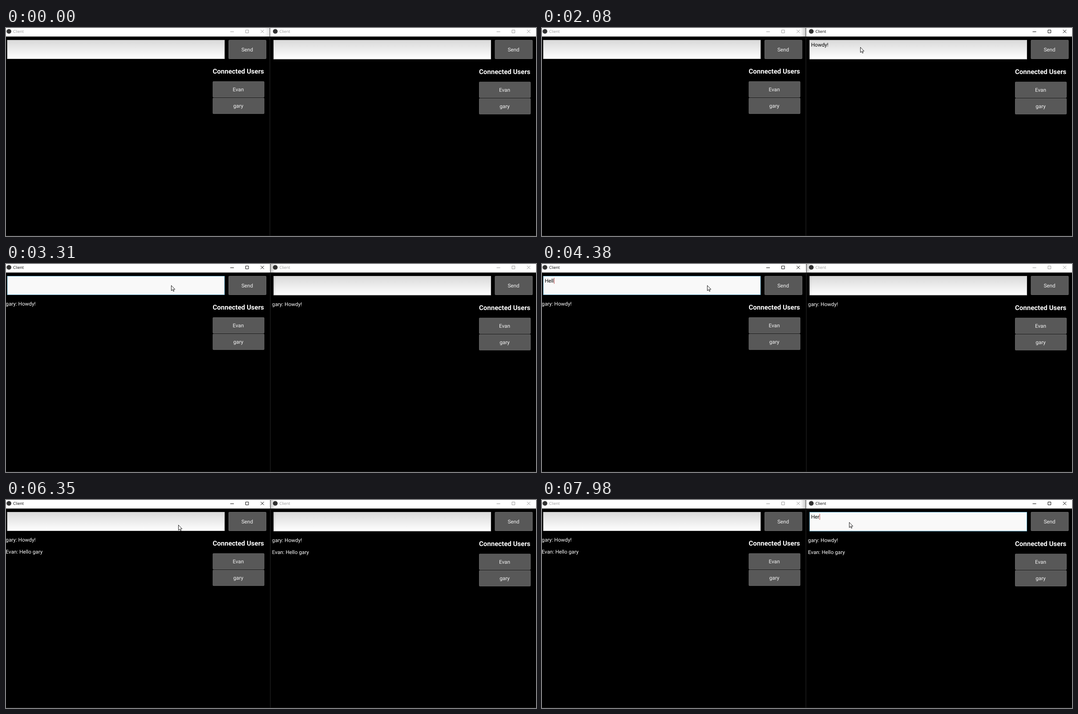
An HTML page for the animation above (8 s loop, 1191 px wide and 470 px high).

```html
<!DOCTYPE html>
<html lang="en">
<head>
<meta charset="utf-8">
<title>Chat clients</title>
<style>
  html, body { margin: 0; width: 100%; height: 100%; overflow: hidden; background: #000; }
  svg { display: block; width: 1191px; height: 470px; }
  text { font: 11.7px Roboto, sans-serif; fill: #fff; white-space: pre; text-rendering: geometricPrecision; }
  .mid { text-anchor: middle; fill: #f4f4f4; }
  .heading { font-size: 15px; font-weight: 700; text-anchor: middle; }
  .title { font: 9px "Open Sans", sans-serif; fill: #999; }
  .controls { fill: none; stroke: #999; }
  .active .title { fill: #000; }
  .active .controls { stroke: #000; }
  .button { fill: #585858; stroke: #686868; }
  .field { fill: url(#idle); stroke: #c4c4c4; }
  .focused .field { fill: #f9f9f9; stroke: #6db7d6; }
  .typed { fill: #000; }
  .caret { fill: #b03a3a; }
</style>
</head>
<body>
<svg viewBox="0 0 1191 470">
  <defs>
    <linearGradient id="idle" x1="0" y1="0" x2="0" y2="1">
      <stop offset="0" stop-color="#d9d9d9"/>
      <stop offset="1" stop-color="#fff"/>
    </linearGradient>
    <linearGradient id="shade">
      <stop offset="0" stop-opacity="0"/>
      <stop offset="1" stop-opacity=".22"/>
    </linearGradient>
  </defs>
  <g id="windows"></g>
  <rect id="shadow" width="12" height="470" fill="url(#shade)"/>
  <rect id="divider" y="0" width="1" height="470" fill="#2b2b2b"/>
  <path d="M0 469.5H1191" stroke="#1e1e1e"/>
  <path id="pointer" d="M.5 .5V12.4L3.2 9.8L5 13.9L6.8 13.1L5 9.2H8.7Z" fill="#fff" stroke="#000" stroke-width=".9"/>
</svg>
<script>
const LOOP = 8000;
const USERS = ["Evan", "gary"];
const MESSAGES = [
  { at: 2630, text: `${USERS[1]}: Howdy!` },
  { at: 5950, text: `${USERS[0]}: Hello ${USERS[1]}` },
];

// One entry per stay in a text field; keys holds the time of each typed letter.
const ENTRIES = [
  { side: 1, focus: 910, hide: 980, show: 1210, blur: 2080, clear: 2310,
    text: "Howdy!", keys: [1210, 1380, 1530, 1690, 1840, 1930] },
  { side: 0, focus: 3230, hide: 3310, show: 3770, blur: 5710, clear: 5870,
    text: `Hello ${USERS[1]}`, keys: [3900, 4060, 4220, 4380, 4540, 4690, 4920, 5080, 5230, 5390] },
  { side: 1, focus: 7120, hide: 7200, show: 7600, blur: LOOP, clear: LOOP,
    text: "Her", keys: [7720, 7850, 7980] },
];

const MOVES = [
  { start: 280, end: 750, steps: 6, from: [1060, 462], to: [715, 43] },
  { start: 2630, end: 2850, steps: 3, from: [715, 43], to: [371, 48] },
  { start: 6350, end: 6740, steps: 5, from: [387, 56], to: [690, 50] },
];

const $ = id => document.getElementById(id);

function button(x, y, w, h, label) {
  return `<rect class="button" x="${x + .5}" y="${y + .5}" width="${w - 1}" height="${h - 1}" rx="1"/>
    <text class="mid" x="${x + w / 2 - .5}" y="${y + h / 2 + 4.4}">${label}</text>`;
}

// The right window sits half a pixel off the grid; its lower part is one pixel down.
function windowMarkup(side) {
  const x = side ? 598.5 : 0, drop = side;
  const users = USERS.map((name, i) => button(464.5, 120.5 + 37.3 * i, 116, 36.3, name)).join("");
  const messages = MESSAGES.map((m, i) =>
    `<text class="message" x="-.7" y="${93.8 + 27 * i}">${m.text}</text>`).join("");
  return `<g class="window">
    <rect x="${side ? 593 : 0}" width="${side ? 598 : 593}" height="19.3" fill="#fff"/>
    <g transform="translate(${x})">
      <circle cx="6.6" cy="7.5" r="5.3" fill="#333"/>
      <text class="title" x="16" y="11.2">Client</text>
      <path class="controls" d="M504 8.5H512M538.5 4.5H545V11H538.5ZM572.3 4L579.7 11.4M579.7 4L572.3 11.4"/>
      <rect class="field" x="3" y="27.5" width="488" height="${42 + drop * .7}"/>
      <text class="typed" x="6.2" y="42"></text>
      <rect class="caret" y="31.3" width="1" height="13.4"/>
      ${button(500, 27, 85, 43, "Send")}
      <g transform="translate(0 ${drop})">
        <text class="heading" x="522.2" y="103.3">Connected Users</text>
        ${users}${messages}
      </g>
    </g>
  </g>`;
}

$("windows").innerHTML = windowMarkup(0) + windowMarkup(1);
const panes = [...document.querySelectorAll(".window")].map(root => ({
  root,
  typed: root.querySelector(".typed"),
  caret: root.querySelector(".caret"),
  messages: root.querySelectorAll(".message"),
}));

const show = (node, on) => node.setAttribute("visibility", on ? "visible" : "hidden");

function activeSide(t) {
  if (t < 750) return -1;
  return t >= 2920 && t < 6810 ? 0 : 1;
}

function drawPane(pane, side, t) {
  const entry = ENTRIES.find(e => e.side === side && t >= e.focus && t < e.clear);
  const focused = !!entry && t < entry.blur;
  pane.root.classList.toggle("active", activeSide(t) === side);
  pane.root.classList.toggle("focused", focused);
  pane.typed.textContent = entry ? entry.text.slice(0, entry.keys.filter(k => k <= t).length) : "";
  show(pane.caret, focused && (t < entry.hide || t >= entry.show));
  const width = pane.typed.textContent ? pane.typed.getComputedTextLength() : 0;
  pane.caret.setAttribute("x", 6.6 + width);
  MESSAGES.forEach((m, i) => show(pane.messages[i], t >= m.at));
}

function drawPointer(t) {
  const move = MOVES.filter(m => m.start <= t).pop();
  show($("pointer"), !!move);
  if (!move) return;
  const raw = Math.min(1, (t - move.start) / (move.end - move.start));
  const p = Math.floor(raw * move.steps) / move.steps;
  const eased = p * p * (3 - 2 * p);
  const [x, y] = move.from.map((a, i) => a + (move.to[i] - a) * eased);
  $("pointer").setAttribute("transform", `translate(${x} ${y})`);
}

function drawEdge(t) {
  const side = activeSide(t);
  $("shadow").setAttribute("transform", side === 0 ? "translate(606) scale(-1 1)" : "translate(581)");
  $("shadow").setAttribute("opacity", side < 0 ? .5 : 1);
  $("divider").setAttribute("x", side === 0 ? 593.5 : 592.5);
}

function frame(now) {
  const t = now % LOOP;
  panes.forEach((pane, side) => drawPane(pane, side, t));
  drawPointer(t);
  drawEdge(t);
  requestAnimationFrame(frame);
}
frame(0);
</script>
</body>
</html>
```
